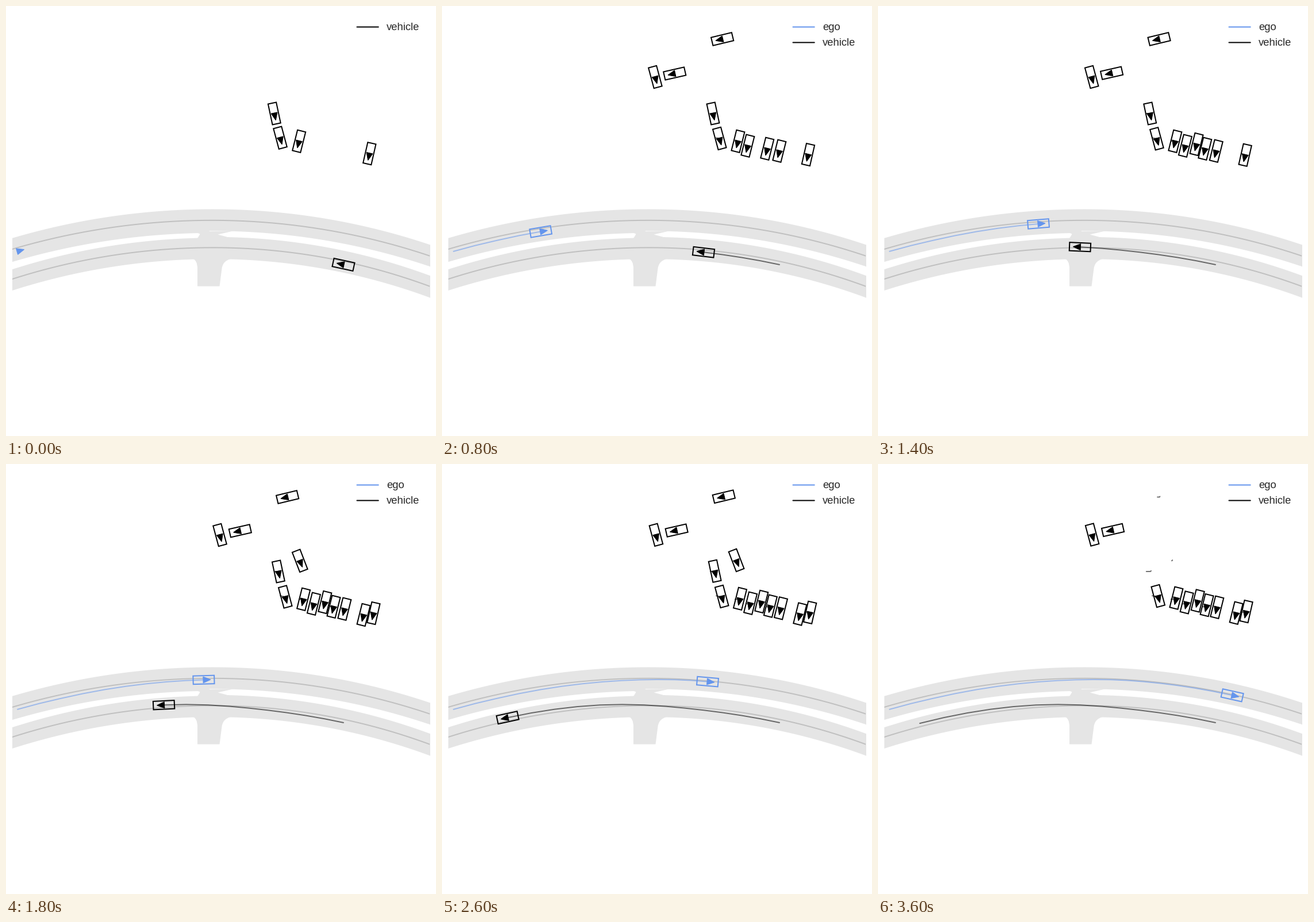
A matplotlib script that plays this animation: 748 by 748 pixels, repeating every 3800 ms.

```python
import numpy as np
import matplotlib.pyplot as plt
from matplotlib.animation import FuncAnimation
from matplotlib.patches import PathPatch, Polygon, Rectangle
from matplotlib.path import Path

SIZE, DPI = 748, 88
FRAMES, STEP = 19, 200
PT = 72 / DPI  # one pixel in points
BLUE, BLACK = "#6495ed", "black"
ROAD, LANE, INK = "#e5e5e5", "#c0c0c0", "#262626"
LENGTH, WIDTH = 36.8, 14.5

plt.rcParams["font.family"] = "Liberation Sans"
fig = plt.figure(figsize=(SIZE / DPI, SIZE / DPI), dpi=DPI, facecolor="white")
ax = fig.add_axes([0, 0, 1, 1])
ax.set(xlim=(-.5, SIZE - .5), ylim=(SIZE - .5, -.5))
ax.axis("off")


# ---- road ----
def arc(x, cx, top, r_left, r_right):
    """Height of a road arc with its own radius on each side of the apex."""
    r = np.where(x < cx, r_left, r_right)
    return top + r - np.sqrt(r ** 2 - (x - cx) ** 2)


def upper(x):
    return arc(x, 358, 372.3, 1229, 1189)


def lower(x):
    return arc(x, 360, 419.8, 1145, 1087)


view = Rectangle((10.5, 10.5), 726, 726, transform=ax.transData)
xs = np.linspace(5, 743, 300)
for road, above, below in ((upper, 19.8, np.where(xs < 352, 21.5, 18)),
                           (lower, np.where(xs < 352, 17.5, 19), 19.3)):
    y = road(xs)
    band = ax.fill_between(xs, y - above, y + below, color=ROAD, lw=0, zorder=1)
    line, = ax.plot(xs, y, color=LANE, lw=2 * PT, zorder=2)
    band.set_clip_path(view)
    line.set_clip_path(view)

# link between the two roads, and the side road with rounded corners
link = [(328, 392), (337, 396), (335.5, 399), (333, 403), (326, 406),
        (394, 404), (368, 397), (394, 391)]
ax.add_patch(Polygon(link, facecolor=ROAD, edgecolor="none", zorder=1))
side = Path([(322, 438), (333, 441), (332.5, 457), (332.5, 487), (371, 487),
             (375, 456), (377, 440), (398, 438)], [1, 3, 3, 2, 2, 2, 3, 3])
ax.add_patch(PathPatch(side, facecolor=ROAD, edgecolor="none", zorder=1))


# ---- cars ----
cars = []


def add_car(x, y, heading, first=0, last=FRAMES - 1, color=BLACK, box_from=0):
    """x, y and heading hold one value for every frame of the loop."""
    cars.append(dict(pos=np.column_stack([x, y]), first=first, last=last,
                     dir=np.column_stack([np.cos(heading), np.sin(heading)]),
                     color=color, box_from=box_from))


f = np.arange(FRAMES)


def park(x, y, angle, first=0, last=FRAMES - 1, dx=8.5, dy=0):
    """A standing car: settles by (dx, dy), then slowly drifts upwards."""
    settle = np.exp(-f / 5)
    rise = np.maximum(f - 9, 0) * (x - 330) / 800
    add_car(x - dx * settle, y - dy * settle - rise,
            np.full(FRAMES, np.radians(angle)), first, last)


def drive(x, path, sign, **options):
    """A car following the curve path(x), turned along its slope."""
    slope = path(x + 1) - path(x - 1)
    add_car(x, path(x), np.arctan2(sign * slope, 2 * sign), **options)


# row of neighbouring bays: x, y, first frame, settling distance
for x, y, first, dx in ((518.7, 234.8, 0, 9.5), (537, 242.7, 3, 12.5),
                        (556, 240, 5, 10), (572, 247.8, 3, 15),
                        (589.5, 251.7, 3, 7), (622.9, 262, 8, 8)):
    park(x, y, 104, first, dx=dx)
park(640.3, 259.6, 102.8, dy=3.4)
park(487, 230.9, 75, dx=10.5, dy=2.2)
park(474.8, 186.5, 78)
cars[-1]["last"] = 16
park(512.2, 167.8, 69, first=8, last=14)
park(372.2, 123, 75, first=3, dx=4)
park(408.3, 115.2, 167.2, first=3, dx=9, dy=-4)
park(490.3, 57, 166.5, first=2, last=14, dx=7)

# oncoming car: steady, then gaining speed while it drifts across its lane
late = np.maximum(f - 6, 0)
drive(586.5 - 33 * f - late * (4.3 + .28 * late),
      lambda x: lower(x) + 6 * np.tanh((x - 372) / 110), -1, last=14)

# ego car: slows through the middle, easing towards the lane centre
turn = 2 * np.pi / 21
drive(19.5 + 33.5 * f + 4.7 / turn * (np.sin(turn * (f - 2)) + np.sin(turn * 2)),
      lambda x: upper(x) + np.interp(x, (100, 420), (6.5, 1.3)), 1,
      color=BLUE, box_from=1)


# ---- drawing ----
live = []


def outline(c, d, color):
    n = np.array([-d[1], d[0]])
    a, b = d * LENGTH / 2, n * WIDTH / 2
    return Polygon([c + a + b, c + a - b, c - a - b, c - a + b], fill=False,
                   edgecolor=color, lw=2 * PT, joinstyle="miter", zorder=5)


def arrow(c, d, color):
    n = np.array([-d[1], d[0]])
    return Polygon([c + 12 * d, c - d + 5.5 * n, c - d - 5.5 * n],
                   facecolor=color, edgecolor=color, lw=PT,
                   joinstyle="miter", zorder=6)


def legend_row(y, label, color):
    live.extend(ax.plot([610, 647.3], [y, y], color=color, lw=2 * PT,
                        solid_capstyle="round", snap=False, zorder=7))
    live.append(ax.text(661.8, y + 5.9, label, size=15, color=INK,
                        va="baseline", zorder=7))


def draw(frame):
    while live:
        live.pop().remove()
    for car in cars:
        if frame < car["first"]:
            continue
        color = car["color"]
        trail = car["pos"][car["first"]:min(frame, car["last"]) + 1]
        if len(trail) > 1:
            live.extend(ax.plot(*trail.T, color=color, alpha=.55, lw=2 * PT,
                                solid_capstyle="round", zorder=4))
        if frame <= car["last"]:
            c, d = car["pos"][frame], car["dir"][frame]
            live.append(ax.add_patch(arrow(c, d, color)))
            if frame >= car["box_from"]:
                live.append(ax.add_patch(outline(c, d, color)))
    rows = [("vehicle", BLACK)]
    if frame > 0:
        rows.insert(0, ("ego", BLUE))
    for i, (label, color) in enumerate(rows):
        legend_row(36 + 27 * i, label, color)
    return live


anim = FuncAnimation(fig, draw, frames=FRAMES, interval=STEP,
                     init_func=lambda: draw(0), repeat=True, repeat_delay=0)
plt.show()
```
